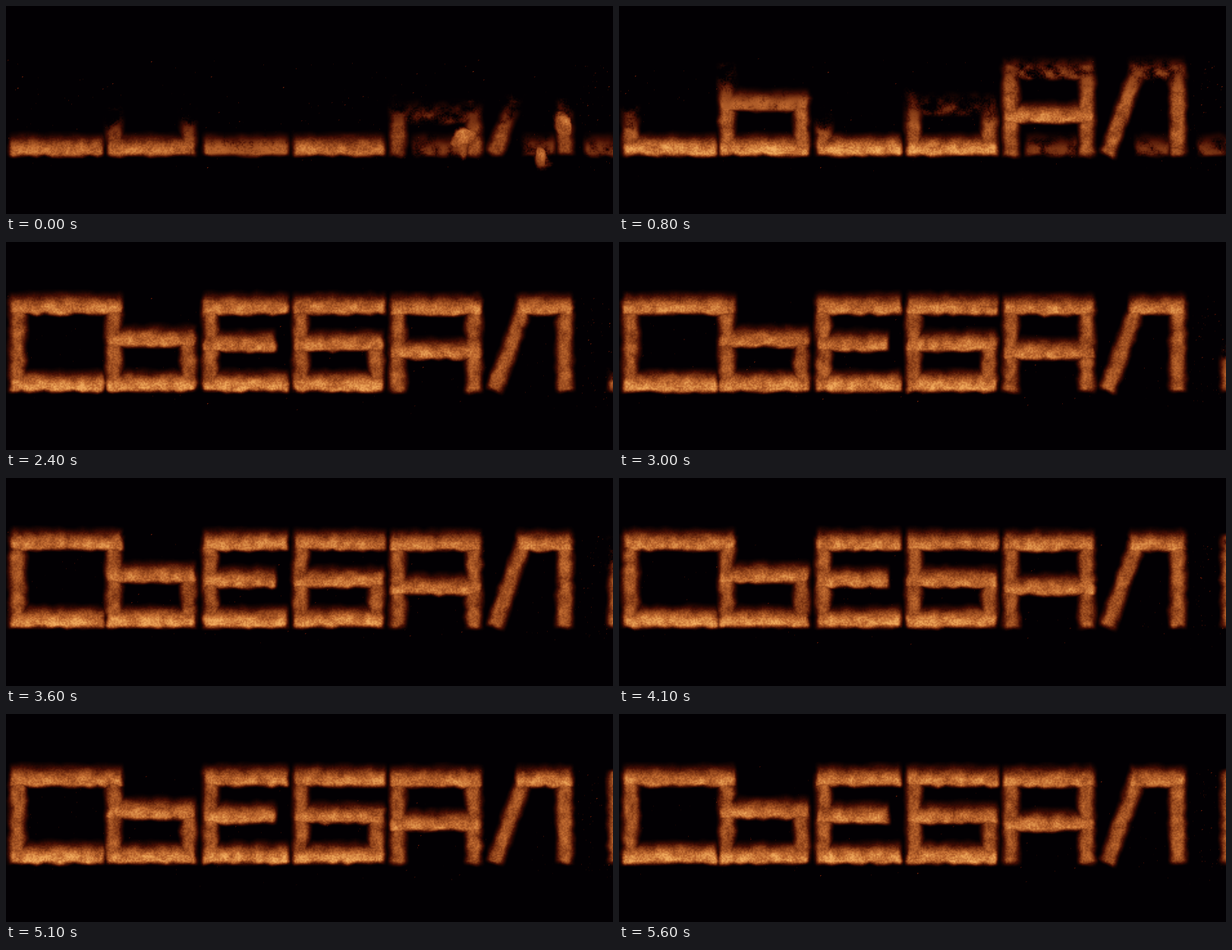
An HTML page with a canvas that plays this animation: 800x275 px, repeating every 5700 ms.

```html
<!DOCTYPE html>
<html lang="en">
<head>
<meta charset="utf-8">
<title>Glowing sand letters</title>
<style>
  html, body { margin: 0; width: 100%; height: 100%; overflow: hidden; background: #020003; }
  canvas { display: block; }
</style>
</head>
<body>
<canvas id="stage" width="800" height="275"></canvas>
<script>
const W = 800, H = 275, LOOP = 5700, STEP = 100;
const TOP = 85, FLOOR = 187;
const ctx = document.getElementById('stage').getContext('2d');
const image = ctx.createImageData(W, H);
const heat = new Float32Array(W * H);

// Each letter is a centre line and a delay in seconds.
const letters = [
  { path: 'M143 85H15V187H119', lag: .3 },
  { path: 'M142 85V187H240V128H142', lag: -.3 },
  { path: 'M362 85H269V187H362M269 134H345', lag: .5 },
  { path: 'M490 85H388V187H488V134H388', lag: .1 },
  { path: 'M516 188V86H616V188M516 144H616', lag: -.6 },
  { path: 'M646 187L682 86H736V187', lag: -.6 },
  { path: 'M804 187V85', lag: 2.6 }
];
// Sand left on the floor for a while, and clouds falling at the start.
const residue = 'M545 187H595M690 187H715M772 187H803';
const clouds = [{ x: 602, y: 176, r: 34 }, { x: 706, y: 194, r: 28 }, { x: 736, y: 155, r: 28 }];

const stops = [[2, 0, 3], [68, 14, 4], [136, 61, 23], [192, 106, 48], [234, 160, 84], [248, 186, 110]];

let seed = 7;
const random = () => (seed = (Math.imul(seed, 1664525) + 1013904223) >>> 0) / 4294967296;
const table = Float32Array.from({ length: 65536 }, random);
const sparks = Array.from({ length: 230 }, () => Array.from({ length: 5 }, random));

const clamp = v => v < 0 ? 0 : v > 1 ? 1 : v;
const smooth = (a, b, v) => { v = clamp((v - a) / (b - a)); return v * v * (3 - 2 * v); };
const cell = (x, y) => table[(y & 255) << 8 | x & 255];

function noise(x, y) {
  const i = Math.floor(x), j = Math.floor(y), u = x - i, v = y - j;
  const a = cell(i, j), c = cell(i, j + 1);
  const top = a + (cell(i + 1, j) - a) * u;
  return top + (c + (cell(i + 1, j + 1) - c) * u - top) * v;
}

// Splits a path of M, L, H and V commands into straight bars.
function bars(path) {
  const list = [];
  let x = 0, y = 0;
  for (const [, cmd, args] of path.matchAll(/([MLHV])([\d ]+)/g)) {
    const [a, b] = args.split(' ').map(Number);
    const nx = cmd === 'V' ? x : a, ny = cmd === 'V' ? a : cmd === 'H' ? y : b;
    if (cmd !== 'M') list.push({ x0: x, y0: y, x1: nx, y1: ny, flat: y === ny });
    x = nx;
    y = ny;
  }
  return list;
}
for (const letter of letters) letter.bars = bars(letter.path);
const residueBars = bars(residue);

function add(x, y, value) {
  const i = y * W + x;
  if (value > heat[i]) heat[i] = value;
}

function eachPixel(left, top, right, bottom, visit) {
  for (let y = Math.max(0, top); y <= Math.min(H - 1, bottom); y++)
    for (let x = Math.max(0, left); x <= Math.min(W - 1, right); x++) visit(x, y);
}

// Thin sand breaks into soft patches, dense sand forms a full body.
function sand(x, y, f, density) {
  const grain = noise(x / 1.7 + f * 37, y / 1.7 + f * 53);
  const flow = noise(x / 9 + 40, y / 9 - f * .35);
  const shown = smooth(0, .7, density * 1.5 - .25 * grain - .55 * flow);
  return shown * (.6 + .34 * grain + .4 * flow);
}

function drawBar({ x0, y0, x1, y1, flat }, f, peak, density) {
  const pad = 24, len = Math.hypot(x1 - x0, y1 - y0), ux = (x1 - x0) / len, uy = (y1 - y0) / len;
  eachPixel(Math.min(x0, x1) - pad, Math.min(y0, y1) - pad,
    Math.max(x0, x1) + pad, Math.max(y0, y1) + pad, (x, y) => {
      const dx = x - x0, dy = y - y0, along = dx * ux + dy * uy;
      const wob = (noise(x / 10, y / 10 - f * .4) - .5) * 4;
      const over = Math.max(-along, along - len) + wob;
      // Flat bars glow upwards and end sharply below.
      const body = (1 - smooth(5, 14, over)) * (flat
        ? smooth(-24, 3, dy + wob) * (1 - smooth(6, 14, dy + wob))
        : 1 - smooth(3, 16, Math.abs(dy * ux - dx * uy + wob)));
      if (body > .01) add(x, y, peak * body * sand(x, y, f, density(y)));
    });
}

function drawLetter(letter, f, t) {
  const warm = .82 + .18 * smooth(0, .8, t);
  for (const bar of letter.bars) {
    const peak = warm * (!bar.flat ? .64 : bar.y0 === FLOOR ? .9 : .8);
    const lag = letter.lag + (bar.flat ? .1 : 0);
    // The sand settles from the floor upwards.
    drawBar(bar, f, peak, y => {
      const height = clamp((FLOOR - (bar.flat ? bar.y0 : y)) / (FLOOR - TOP));
      return clamp((t + 1.5 - lag - 2.2 * Math.sqrt(height)) / 1.3);
    });
  }
}

function drawCloud({ x: cx, y: cy, r }, f, t) {
  const level = 1 - smooth(.2, .8, t);
  if (level) eachPixel(cx - r, cy - r, cx + r, cy + r, (x, y) => {
    const wob = (noise(x / 14, y / 14 - f * .4) - .5) * 22;
    const body = 1 - smooth(0, r, Math.hypot((x - cx) * 1.2, y - cy) + wob);
    if (body > .01) add(x, y, .75 * Math.sqrt(body) * sand(x, y, f, level * body));
  });
}

function drawSpark([a, b, c, d, e], i, t) {
  const age = (t * (.6 + e) + c) % 1;
  const x = Math.round((i % 6 ? a * W : 750 + a * 50) + Math.sin(age * 5 + d * 6) * 7);
  const y = Math.round(68 + b * 138 + age * age * 24);
  if (x < 0 || x >= W - 1) return;
  const glow = Math.sin(age * Math.PI) * (.1 + .28 * d * d);
  add(x, y, glow);
  add(x, y + 1, glow * .6);
  if (d > .7) add(x + 1, y, glow * .7);
}

function paint() {
  const px = image.data;
  for (let i = 0, o = 0; i < heat.length; i++, o += 4) {
    const v = Math.min(heat[i] * 4, 4.99), k = Math.floor(v), m = v - k;
    for (let c = 0; c < 3; c++) px[o + c] = stops[k][c] + (stops[k + 1][c] - stops[k][c]) * m;
    px[o + 3] = 255;
  }
  ctx.putImageData(image, 0, 0);
}

let shown = -1;
function tick() {
  const f = Math.floor(performance.now() % LOOP / STEP);
  if (f !== shown) {
    shown = f;
    const t = f * STEP / 1000;
    const left = .55 * (1 - smooth(1, 2.4, t));
    heat.fill(0);
    letters.forEach(letter => drawLetter(letter, f, t));
    if (left) residueBars.forEach(bar => drawBar(bar, f, .6, () => left));
    clouds.forEach(cloud => drawCloud(cloud, f, t));
    sparks.forEach((spark, i) => drawSpark(spark, i, t));
    paint();
  }
  requestAnimationFrame(tick);
}
tick();
</script>
</body>
</html>
```
